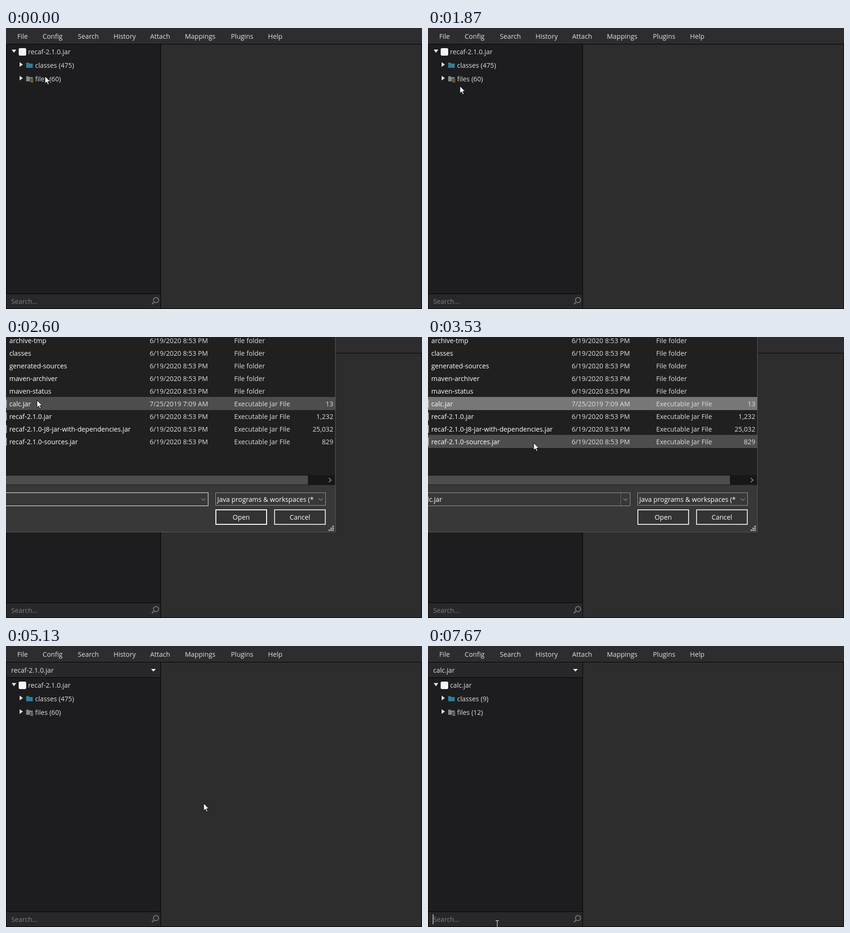
Recreate the animation shown at these times as an HTML page. Size 886 by 600 pixels, loop 8000 ms.

```html
<!DOCTYPE html>
<html lang="en">
<head>
<meta charset="utf-8">
<title>Adding a library to a workspace</title>
<style>
html, body { margin: 0; width: 100%; height: 100%; overflow: hidden; background: #2d2d2d; }
svg { display: block; font: 14.2px "Open Sans", "Noto Sans", sans-serif; cursor: default; }
.popup { filter: drop-shadow(0 4px 5px rgba(0, 0, 0, .35)); }
</style>
</head>
<body>
<svg id="stage" width="886" height="600" viewBox="0 0 886 600"></svg>
<script>
const stage = document.getElementById('stage');
const LOOP = 8000;
const TEXT = '#e0e0e0', HOVER = '#3d3d3d', POPUP = '#1b1b1c', BAR = '#28282b';

// Pointer stops: time, x, y
const STOPS = [
  [0, 83, 103], [400, 33, 22], [1000, 33, 22], [1530, 68, 124], [2470, 68, 124],
  [2600, 66, 135], [3130, 66, 135], [3930, 455, 360], [4270, 471, 377], [4930, 471, 377],
  [5130, 421, 336], [5800, 230, 55], [6200, 230, 55], [6470, 213, 111], [6530, 213, 117],
  [6930, 213, 117], [7400, 169, 568], [7530, 169, 568], [7670, 147, 594], [8000, 147, 594]
];

const rect = (x, y, w, h, fill, extra = '') =>
  `<rect x="${x}" y="${y}" width="${w}" height="${h}" fill="${fill}" ${extra}/>`;
const frame = (x, y, w, h, fill, line, width = 1) =>
  rect(x + width / 2, y + width / 2, w - width, h - width, fill, `stroke="${line}" stroke-width="${width}"`);
const text = (x, y, s, fill = TEXT, extra = '') =>
  `<text x="${x}" y="${y}" fill="${fill}" ${extra}>${s}</text>`;
const shape = (d, fill = TEXT) => `<path d="${d}" fill="${fill}"/>`;
const line = (d, color, width = 1) => `<path d="${d}" fill="none" stroke="${color}" stroke-width="${width}"/>`;
const jarIcon = (x, y) => rect(x, y, 16, 16, '#f4f4f4', 'rx="3"');
const between = (t, a, b) => t >= a && t < b;

// Smooth curve through the stops, at rest wherever the pointer pauses
function pointer(t) {
  let i = 0;
  while (i < STOPS.length - 2 && t >= STOPS[i + 1][0]) i++;
  const same = (p, q) => p[1] === q[1] && p[2] === q[2];
  const slope = (j, c) => {
    const p = STOPS[j - 1], q = STOPS[j], r = STOPS[j + 1];
    return !p || !r || same(p, q) || same(q, r) ? 0 : (r[c] - p[c]) / (r[0] - p[0]);
  };
  const a = STOPS[i], b = STOPS[i + 1], d = b[0] - a[0], u = (t - a[0]) / d, v = 1 - u;
  const at = c => a[c] * v * v * (1 + 2 * u) + b[c] * u * u * (3 - 2 * u)
    + d * u * v * (slope(i, c) * v - slope(i + 1, c) * u);
  return [Math.round(at(1)), Math.round(at(2))];
}

function windowFrame() {
  const names = [['Config', 78], ['Search', 153], ['History', 229], ['Attach', 307],
    ['Mappings', 381], ['Plugins', 479], ['Help', 558]];
  return rect(0, 0, 886, 600, '#000') + rect(0, 0, 886, 34, '#2d2d30')
    + rect(1, 35, 328, 532, '#1d1d1f') + rect(330, 35, 555, 564, '#2d2d2d')
    + rect(1, 568, 328, 31, BAR)
    + names.map(([s, x]) => text(x, 23, s)).join('')
    + text(11, 589, 'Search...', '#818184')
    + '<circle cx="319.5" cy="581" r="5.5" fill="none" stroke="#777" stroke-width="1.8"/>'
    + line('M315.5 585L310.5 590', '#777', 2.4);
}

function folder(y, color) {
  return shape(`M43 ${y}h5l2 2h7v9h-14z`, color);
}

function tree(t) {
  const added = t >= 5000, calc = t >= 6800;
  let s = `<g transform="translate(0 ${added ? 33 : 0})">`
    + shape('M12 46h10l-5 7z') + jarIcon(27, 43) + text(47, 56, calc ? 'calc.jar' : 'recaf-2.1.0.jar')
    + shape('M29 73l7 5l-7 5z') + folder(74, '#2f7d98') + text(62, 85, `classes (${calc ? 9 : 475})`)
    + shape('M29 102l7 5l-7 5z') + folder(103, '#7d888d') + rect(51, 108, 7, 9, '#1d1d1f');
  for (let y = 109; y < 117; y += 2) s += rect(52, y, 6, 1, added ? '#a4a8aa' : '#d08a34');
  s += text(62, 114, `files (${calc ? 12 : 60})`) + '</g>';
  if (added) s += rect(1, 35, 328, 32, BAR) + rect(1, 67, 328, 1, '#000') + comboValue(t);
  return s;
}

function comboValue(t) {
  return text(11, 57, t < 6730 ? 'recaf-2.1.0.jar' : 'calc.jar') + shape('M309 49h10l-5 5.5z', '#fff');
}

function comboPopup(t, y) {
  const row = Math.floor((y - 69) / 29);
  return `<g class="popup">${frame(1, 35, 329, 94, POPUP, '#000')}</g>`
    + (row >= 0 ? rect(2, 69 + row * 29, 326, 29, HOVER) : '')
    + comboValue(t)
    + jarIcon(8, 74) + text(28, 89, '[Primary]', TEXT, 'font-weight="700"') + text(99, 89, 'recaf-2.1.0.jar')
    + jarIcon(8, 105) + text(28, 118, 'calc.jar');
}

function menuList(x, y, w, h, items, row) {
  return `<g class="popup">${frame(x, y, w, h, POPUP, '#000')}</g>`
    + (row >= 0 ? rect(x + 2, y + 3 + row * 29, w - 4, 29, HOVER) : '')
    + items.map((s, i) => text(x + 14, y + 23 + i * 29, s)).join('');
}

function fileMenu(t, y) {
  const open = between(t, 600, 1800), row = Math.floor((y - 38) / 29);
  let s = '';
  if (open) {
    s += rect(10, 0, 52, 34, HOVER)
      + menuList(10, 35, 159, 151, ['Load', 'Recent', 'Add library', 'Export program', 'Save workspace'], row)
      + shape('M155 77l5 4.5l-5 4.5z');
    if (row === 1) s += menuList(168, 64, 199, 182, ['recaf-2.1.0.jar', 'calc.jar',
      'recaf-2.1.0-sources.jar', 'recaf-2.0.0.jar', 'recaf-1.15.10.jar', 'classes.jar'], -1);
  }
  return s + text(24, 23, 'File', between(t, 330, 1800) ? '#fff' : TEXT);
}

function button(x, label, fill, edge) {
  return frame(x, 368, 110, 33, fill, edge, 2) + text(x + 55, 390, label, '#fff', 'text-anchor="middle"');
}

function dialog(t, x, y) {
  const files = [['archive-tmp'], ['classes'], ['generated-sources'], ['maven-archiver'], ['maven-status'],
    ['calc.jar', '13'], ['recaf-2.1.0.jar', '1,232'],
    ['recaf-2.1.0-J8-jar-with-dependencies.jar', '25,032'], ['recaf-2.1.0-sources.jar', '829']];
  const picked = t >= 3130, row = Math.floor((y + 7) / 27);
  const over = x >= 446 && x < 556 && y >= 368 && y < 401;
  const show = t < 4470 ? 1 - (1 - Math.min(1, (t - 1870) / 330)) ** 2 : 1 - (t - 4400) / 270;
  const zoom = .92 + .08 * show;

  let s = `<g opacity="${show}" transform="translate(227 117) scale(${zoom}) translate(-227 -117)">`
    + rect(0, 0, 702, 417, '#5a5a5a') + rect(0, 0, 701, 295, '#202020') + rect(0, 295, 701, 121, '#383838')
    + rect(0, 295, 701, 21, '#171717') + rect(0, 296, 643, 19, '#4d4d4d')
    + line('M687.5 301l5 4.5l-5 4.5', '#aaa', 1.3);
  if (row < 9 && !(picked && row === 5)) s += rect(0, row * 27 - 7, 701, 28, '#4d4d4d');
  if (picked) s += rect(0, 128, 701, 28, t < 4330 ? '#777' : '#666');

  files.forEach(([name, size], i) => {
    const base = 13 + i * 27;
    s += text(7, base, name, '#fff')
      + text(306, base, i === 5 ? '7/25/2019 7:09 AM' : '6/19/2020 8:53 PM', '#dedede')
      + text(486, base, size ? 'Executable Jar File' : 'File folder', '#dedede');
    if (size) s += text(697, base, size, '#dedede', 'text-anchor="end"') + rect(0, base - 14, 1.5, 17, '#bbb');
  });

  s += frame(-2, 332, 433, 29, '#383838', picked ? '#9b9b9b' : '#fff')
    + line('M416 344.5l4.5 4.5l4.5 -4.5', '#ccc');
  if (picked) s += rect(410, 333, 1, 27, '#6b6b6b') + text(30, 352, 'calc.jar', '#fff', 'text-anchor="end"');
  s += frame(446, 332, 235, 28, '#383838', '#9b9b9b')
    + text(450, 352, 'Java programs &amp; workspaces (*', '#fff')
    + line('M666 344.5l4.5 4.5l4.5 -4.5', '#ccc')
    + button(446, 'Open', over ? (t < 4330 ? '#474747' : '#666') : '#333', picked ? '#e4e4e4' : '#fff')
    + button(571, 'Cancel', '#333', '#dcdcdc');
  for (let r = 0; r < 3; r++)
    for (let c = 2 - r; c < 3; c++) s += rect(687 + c * 4, 403 + r * 4, 3, 3, '#b8b8b8');
  return s + '</g>';
}

function arrow(x, y) {
  return `<path transform="translate(${x} ${y})" d="M0 0V15.5L3.6 12.2L6.2 18L8.6 17L6.1 11.3H11Z"
    fill="#fff" stroke="#000" stroke-width="1"/>`;
}

function beam(x, y) {
  return line(`M${x - 3} ${y - 7.5}h7m-7 15h7M${x + .5} ${y - 7.5}v15`, '#fff');
}

function scene(t) {
  const [x, y] = pointer(t);
  let s = windowFrame() + tree(t) + fileMenu(t, y);
  if (between(t, 5930, 6730)) s += comboPopup(t, y);
  if (between(t, 1930, 4670)) s += dialog(t, x, y);
  if (t >= 7670) s += rect(10, 573, 1.5, 21, '#c8c8c8');
  return s + (y >= 568 ? beam(x, y) : arrow(x, y));
}

// The screen refreshes 15 times a second
let shown = -1;
function draw(now) {
  const step = Math.floor((now % LOOP) * .015 + .05) % 120;
  if (step !== shown) stage.innerHTML = scene(Math.round(step * 20 / 3) * 10);
  shown = step;
  requestAnimationFrame(draw);
}
draw(0);
</script>
</body>
</html>
```
